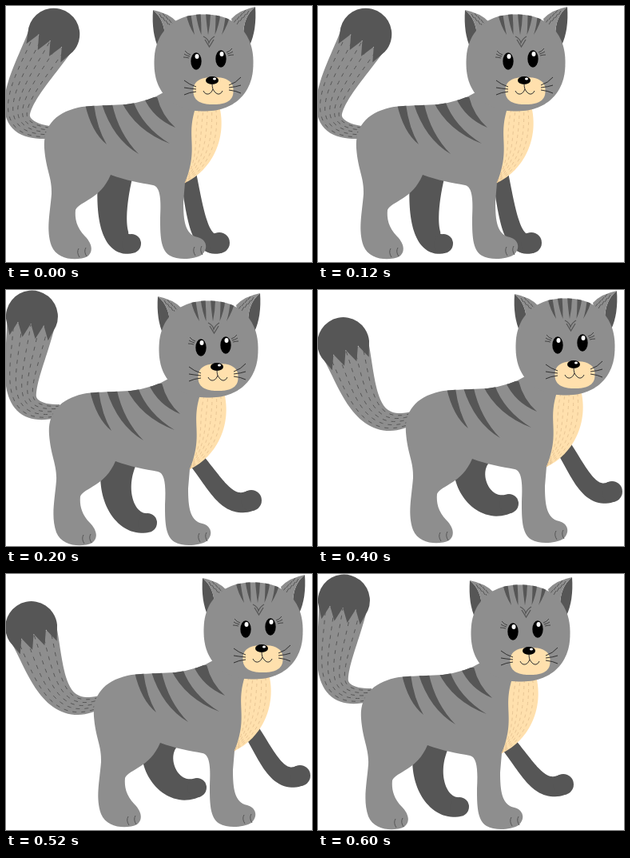
An HTML page with a canvas that plays this animation: 383x320 px, repeating every 800 ms.

```html
<!DOCTYPE html>
<html lang="en">
<head>
<meta charset="utf-8">
<title>Walking cat</title>
<style>
html, body { margin: 0; width: 100%; height: 100%; overflow: hidden; background: #fff; }
canvas { display: block; }
</style>
</head>
<body>
<canvas id="stage" width="383" height="320"></canvas>
<script>
const ctx = document.getElementById('stage').getContext('2d');
const FUR = '#8e8e8e', DARK = '#565656', CREAM = '#ffe0ad', INK = '#303030';
const STEP = 200;

// Each limb is one cubic curve: x, y of its four control points.
const POSES = [
  {
    x: 0, y: 0,
    tail: [54, 158, -21, 154, 30, 90, 55, 44],
    hind: [138, 205, 130, 250, 130, 302, 157, 297],
    fore: [226, 200, 236, 250, 240, 305, 267, 296]
  },
  {
    x: 6, y: 3,
    tail: [68, 151, -2, 160, 22, 105, 31, 43],
    hind: [145, 205, 126, 250, 147, 295, 177, 291],
    fore: [232, 205, 262, 240, 276, 276, 307, 263]
  },
  {
    x: 62, y: 0,
    tail: [118, 160, 59, 182, 50, 118, 35, 76],
    hind: [195, 205, 178, 235, 205, 280, 239, 267],
    fore: [303, 190, 325, 222, 338, 264, 368, 252]
  }
];

const BODY = new Path2D(`M199 107Q180 119 150 123C120 125 103 124 90 127
  C60 134 46 152 48 178C50 205 58 215 57 235C55 260 50 280 57 300
  C64 318 90 319 102 313C111 306 106 295 99 288C88 277 86 265 87 255
  C92 244 118 242 131 211C150 218 168 221 184 224C194 226 194 245 193 265
  C193 285 193 305 205 312C215 318 235 317 245 311C254 303 251 292 240 289
  C224 286 222 268 222 245L224 221L240 190V105Z`);
const HEAD = roundish(247.5, 71, 62, 60.5, 2.25);
const MUZZLE = roundish(259.5, 106, 25, 17, 2.5);
const CHEST = [
  [238, 125, 224, 165, 242, 175, 224, 221],
  [267, 125, 277, 165, 258, 205, 224, 221]
];

const mix = (a, b, k) => a + (b - a) * k;

// Ellipse with a squareness exponent.
function roundish(x, y, rx, ry, n) {
  const shape = new Path2D();
  const bend = v => Math.sign(v) * Math.abs(v) ** (2 / n);
  for (let a = 0; a < Math.PI * 2; a += 0.05)
    shape.lineTo(x + rx * bend(Math.cos(a)), y + ry * bend(Math.sin(a)));
  shape.closePath();
  return shape;
}

function fill(color, shape) {
  ctx.fillStyle = color;
  ctx.fill(typeof shape === 'string' ? new Path2D(shape) : shape);
}

function stroke(shape, color = INK, width = 1) {
  ctx.strokeStyle = color;
  ctx.lineWidth = width;
  ctx.stroke(typeof shape === 'string' ? new Path2D(shape) : shape);
}

function oval(color, x, y, rx, ry = rx) {
  const shape = new Path2D();
  shape.ellipse(x, y, rx, ry, 0, 0, Math.PI * 2);
  fill(color, shape);
}

function clipped(shape, paint) {
  ctx.save();
  ctx.clip(shape);
  paint();
  ctx.restore();
}

// Point at t on a cubic, moved sideways by a distance.
function along([x0, y0, x1, y1, x2, y2, x3, y3], t, side) {
  const u = 1 - t;
  const at = (a, b, c, d) => u * u * u * a + 3 * u * u * t * b + 3 * u * t * t * c + t * t * t * d;
  const slope = (a, b, c, d) => u * u * (b - a) + 2 * u * t * (c - b) + t * t * (d - c);
  const dx = slope(x0, x1, x2, x3), dy = slope(y0, y1, y2, y3), len = Math.hypot(dx, dy);
  return [at(x0, x1, x2, x3) - dy / len * side, at(y0, y1, y2, y3) + dx / len * side];
}

function trace(shape, curve, w0, w1, k, back) {
  for (let i = 0; i <= 40; i++) {
    const t = (back ? 40 - i : i) / 40;
    shape.lineTo(...along(curve, t, k * mix(w0, w1, t)));
  }
  return shape;
}

function limb(color, curve, w0, w1) {
  const shape = trace(new Path2D(), curve, w0, w1, 1);
  fill(color, trace(shape, curve, w0, w1, -1, true));
}

function dashes(row, shape, color, on, off) {
  ctx.setLineDash([on, off]);
  ctx.lineDashOffset = row % 2 * (on + off) / 2;
  stroke(shape, color);
  ctx.setLineDash([]);
}

function drawTail(tail) {
  const w0 = 8, w1 = 30, r = 32.5;
  limb(FUR, tail, w0, w1);
  for (let row = -2; row <= 2; row++)
    dashes(row, trace(new Path2D(), tail, w0, w1, row * 0.36), DARK, 5, 6);

  // Dark ball whose open side ends in teeth.
  const [x2, y2, x3, y3] = tail.slice(4);
  ctx.save();
  ctx.translate(x3, y3);
  ctx.rotate(Math.atan2(y3 - y2, x3 - x2) + Math.PI / 2);
  ctx.translate(0, -10);
  const ball = new Path2D();
  ball.arc(0, 0, r, Math.PI - 0.25, 0.25);
  for (let i = 1; i < 8; i++) ball.lineTo(r * (1 - i / 4), i % 2 ? 27 : 9);
  fill(DARK, ball);
  ctx.restore();
}

function drawLeg(curve, w0, w1) {
  limb(DARK, curve, w0, w1);
  oval(DARK, curve[6], curve[7], w1);
}

function drawBody() {
  fill(FUR, BODY);
  clipped(BODY, () => {
    const tips = [[126, 173], [166, 185], [205, 172], [212, 152]];
    tips.forEach(([tx, ty], i) => {
      const a = 99 + 19 * i + 1.8 * i * i, b = a + 11 + i * 2, y = 123 - i * i;
      fill(DARK, `M${a} ${y}Q${mix(a, tx, 0.3)} ${mix(y, ty, 0.7)} ${tx} ${ty}
        Q${mix(b, tx, 0.25)} ${mix(y, ty, 0.6)} ${b} ${y}Z`);
    });
  });

  const [left, right] = CHEST;
  const bib = trace(new Path2D(), left, 0, 0, 0);
  fill(CREAM, trace(bib, right, 0, 0, 0, true));
  for (let row = 1; row <= 5; row++) {
    const curve = left.map((v, i) => mix(v, right[i], row / 6));
    dashes(row, trace(new Path2D(), curve, 0, 0, 0), '#e8c594', 4, 4);
  }
  for (const [x, y] of [[90, 303], [99, 302], [235, 301], [244, 300]])
    stroke(`M${x + 1} ${y}q-3 5 1 11`, DARK);
}

function drawEar(x, y, flip) {
  ctx.save();
  ctx.translate(x, y);
  ctx.scale(flip, 1);
  fill(DARK, 'M0 0Q-2 29 7 48L24 40L15 36Q15 12 0 0Z');
  fill(FUR, 'M0 0Q20 4 30 15L24 40L15 36Q15 12 0 0Z');
  for (let i = 0; i < 4; i++)
    stroke(`M${8 + i * 4} ${5 + i * 4}l3 5m1 -6l3 4`, DARK);
  ctx.restore();
}

function drawEye(x, y, side) {
  oval('#000', x, y, 6.7, 10.7);
  oval('#fff', x + 1, y - 6, 2.5, 3);
  for (let i = 0; i < 3; i++)
    stroke(`M${x + side * (7 + i)} ${y - 8 + i * 2}q${side * 4} -1 ${side * 7} ${i * 2 - 5}`, INK, 0.8);
}

function drawHead() {
  drawEar(184, 5, 1);
  drawEar(312, 1, -1);
  fill(FUR, HEAD);
  clipped(HEAD, () => {
    for (let i = -2; i <= 2; i++) {
      const x = 253 + i * 12.5;
      fill(DARK, `M${x - 3} 8Q${x - 2 - i} 24 ${x - i * 4} 36Q${x + 3 - i} 22 ${x + 3} 8Z`);
    }
  });
  stroke('M247 38Q253 41 254 46Q256 41 261 38M249 42L254.500 51L260 42', DARK, 1.3);

  drawEye(238, 69, -1);
  drawEye(269, 66, 1);
  fill(CREAM, MUZZLE);
  oval('#000', 258, 93, 8, 5);
  oval('#fff', 261, 91, 2, 1.5);
  stroke('M258 97Q258 101 259 104Q256 111 251 110Q248 109 247 106M259 104Q263 111 267 110Q270 109 271 106');
  for (let i = -1; i <= 1; i++) {
    stroke(`M238 ${104 + i * 3}q-9 ${i * 2 - 1} -15 ${i * 6 - 2}`);
    stroke(`M279 ${102 + i * 3}q9 ${i * 2 - 1} 15 ${i * 7 - 3}`);
  }
}

function draw(time) {
  // The walk swings through the poses and back again.
  const beat = Math.floor(time / STEP) % 4;
  const pose = POSES[2 - Math.abs(2 - beat)];
  ctx.clearRect(0, 0, 383, 320);
  drawTail(pose.tail);
  drawLeg(pose.hind, 22, 12);
  drawLeg(pose.fore, 10, 13);
  ctx.save();
  ctx.translate(pose.x, pose.y);
  drawBody();
  drawHead();
  ctx.restore();
}

let start;
function tick(now) {
  start ??= now;
  draw(now - start);
  requestAnimationFrame(tick);
}
requestAnimationFrame(tick);
</script>
</body>
</html>
```
